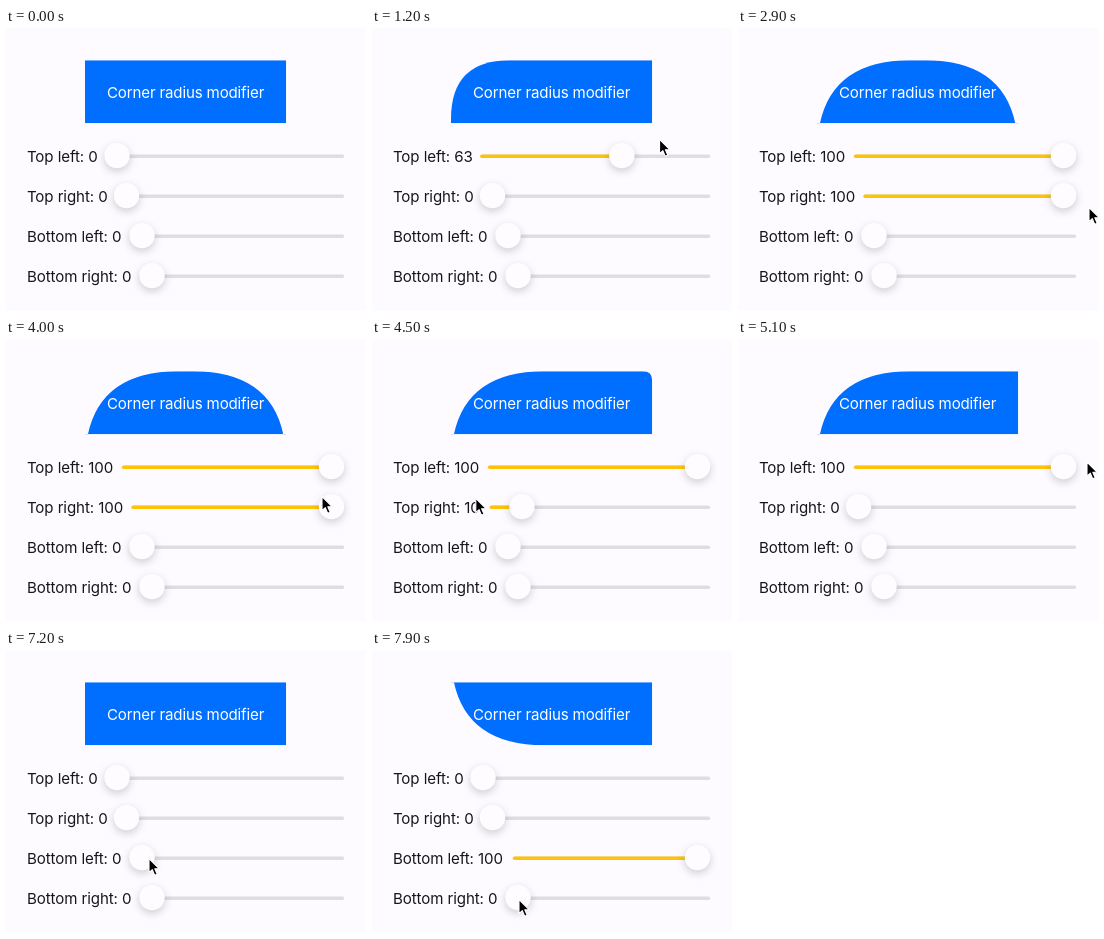
These frames come from a looping animation (360x283 px, 8 s). An HTML page:

```html
<!DOCTYPE html>
<html lang="en">
<head>
<meta charset="utf-8">
<title>Corner radius modifier</title>
<style>
  html, body { margin: 0; width: 100%; height: 100%; overflow: hidden; background: #fdfbff; }
  svg { display: block; }
  text { font: 400 15.1px Inter, "Liberation Sans", sans-serif; letter-spacing: -.09px; fill: #161618; white-space: pre; }
  .title { fill: #fff; text-anchor: middle; letter-spacing: -.16px; }
  .track, .fill { stroke-width: 3.6; stroke-linecap: round; }
  .track { stroke: #dfdde2; }
  .fill { stroke: #fec309; }
  .thumb { fill: #fefcff; filter: drop-shadow(0 3px 4px rgba(0, 0, 0, .19)); }
</style>
</head>
<body>
<svg width="360" height="283" viewBox="0 0 360 283">
  <svg x="79" y="32.2" width="201.2" height="63" overflow="hidden"><path id="card" fill="#006fff"/></svg>
  <text class="title" x="179.6" y="69.7">Corner radius modifier</text>
  <g id="rows"></g>
  <path id="cursor" d="M0-.5V13.7L3.3 10.7L5.7 16.3L8.2 15.2L5.8 9.8H10.3Z"
    fill="#000" stroke="#fff" stroke-width="1.1" stroke-linejoin="round"/>
</svg>
<script>
const LOOP = 8000, STEP = 100;
const W = 201.2, H = 63, SCALE = 0.93;
const TRACK_END = 338.2, CAP = 1.8, THUMB = 12.7;
const LEAD = 40, SETTLE = 100;

const sliders = [
  { name: 'Top left', left: 98.3 },
  { name: 'Top right', left: 107.8 },
  { name: 'Bottom left', left: 123.3 },
  { name: 'Bottom right', left: 133.3 }
];

// Each gesture moves the pointer to `grab`, then drags a slider if it has a row.
const gestures = [
  { row: 0, to: 100, start: 900, end: 1410, grab: [112, 126], release: [349, 107] },
  { row: 1, to: 100, start: 2500, end: 2900, grab: [120, 172], release: [351, 180] },
  { row: 1, to: 0, start: 4100, end: 4600, grab: [316, 158], release: [95, 160] },
  { start: 5200, grab: [349, 123.5] },
  { row: 0, to: 0, start: 5600, end: 6250, grab: [326, 130], release: [60, 126] },
  { row: 2, to: 100, start: 7300, end: 7660, grab: [143, 209], release: [347, 212] },
  { start: LOOP, grab: [147, 250] }
];

const $ = id => document.getElementById(id);
const mix = (a, b, u) => a + (b - a) * u;
const move = (p, q, u) => p.map((v, i) => mix(v, q[i], u));
const progress = (t, start, end) => Math.min(1, Math.max(0, (t - start) / (end - start)));
const smooth = u => u * u * (3 - 2 * u);
const easeOut = u => 1 - (1 - u) ** 3;

function set(el, attrs) {
  for (const key in attrs) el.setAttribute(key, attrs[key]);
}

function add(tag, attrs) {
  const el = document.createElementNS('http://www.w3.org/2000/svg', tag);
  set(el, attrs);
  $('rows').append(el);
  return el;
}

sliders.forEach((s, i) => {
  const y = 128 + 40 * i, line = { y1: y + 0.3, y2: y + 0.3 };
  s.label = add('text', { x: 20.9, y: y + 5.8 });
  s.track = add('line', { class: 'track', x2: TRACK_END - CAP, ...line });
  s.fill = add('line', { class: 'fill', ...line });
  s.thumb = add('circle', { class: 'thumb', cy: y - 0.4, r: THUMB });
});

function valueAt(row, t) {
  let value = 0;
  for (const g of gestures)
    if (g.row === row && t >= g.start)
      value = mix(100 - g.to, g.to, smooth(progress(t, g.start, g.end)));
  return Math.round(value);
}

function pointerAt(t) {
  let pos = [190, 200], free = 0;
  for (const g of gestures) {
    if (t < free) break;
    const arrive = g.start - SETTLE;
    pos = move(pos, g.grab, easeOut(progress(t, free, arrive)));
    if (g.release) pos = move(pos, g.release, smooth(progress(t + LEAD, g.start, g.end)));
    free = g.release ? g.end : arrive;
  }
  return pos;
}

function drawSlider(s, value) {
  // Longer numbers push the track to the right.
  const left = s.left + (value === 100 ? 17.6 : value > 9 ? 9.9 : 0);
  const cx = mix(left + THUMB, TRACK_END - THUMB, value / 100);
  s.label.textContent = `${s.name}: ${value}`;
  set(s.track, { x1: left + CAP });
  set(s.fill, { x1: left + CAP, x2: cx, visibility: value ? 'visible' : 'hidden' });
  set(s.thumb, { cx });
}

// Radii may exceed the card height; the nested svg clips the excess.
function cardPath([tl, tr, bl, br]) {
  return `M${bl} ${H}Q0 ${H} 0 ${H - bl}V${tl}Q0 0 ${tl} 0` +
    `H${W - tr}Q${W} 0 ${W} ${tr}V${H - br}Q${W} ${H} ${W - br} ${H}Z`;
}

function draw(now) {
  const t = Math.floor((now % LOOP) / STEP) * STEP;
  const values = sliders.map((s, i) => valueAt(i, t));
  sliders.forEach((s, i) => drawSlider(s, values[i]));
  set($('card'), { d: cardPath(values.map(v => v * SCALE)) });
  set($('cursor'), {
    transform: `translate(${pointerAt(t)})`,
    visibility: t < STEP ? 'hidden' : 'visible'
  });
  requestAnimationFrame(draw);
}
draw(performance.now());
</script>
</body>
</html>
```
